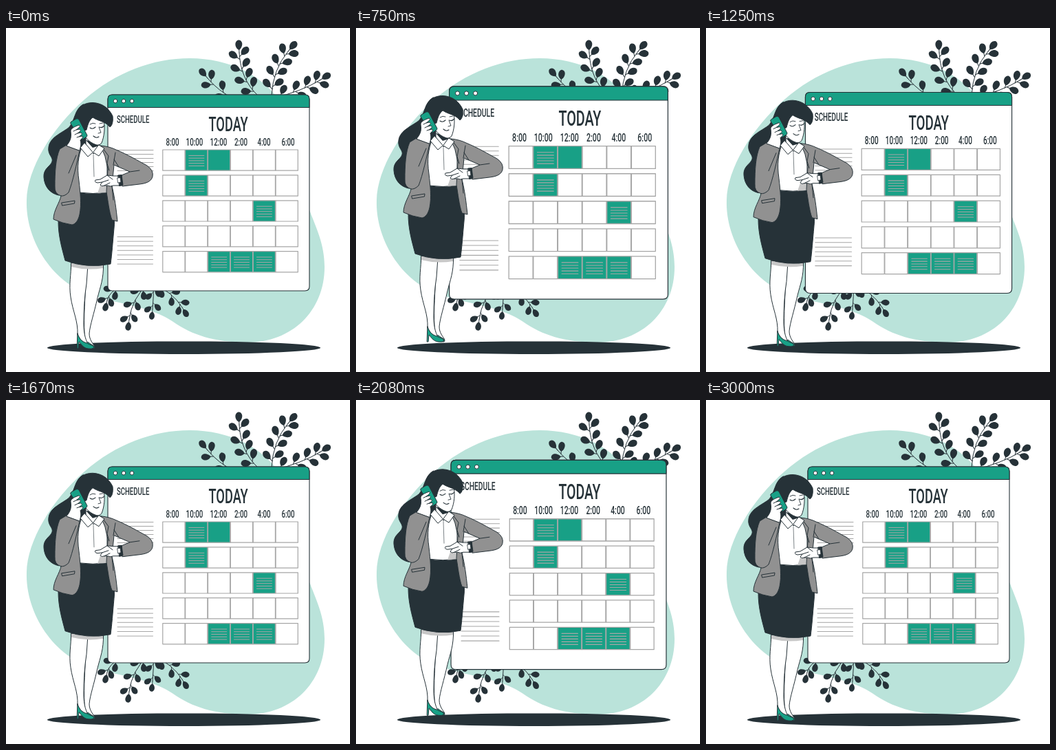
Recreate the animation shown at these times as an HTML page with a canvas. Size 500 by 500 pixels, loop 3.04 s.

```html
<!DOCTYPE html>
<html lang="en">
<head>
<meta charset="utf-8">
<title>Schedule</title>
<style>
html, body { margin: 0; width: 100%; height: 100%; overflow: hidden; background: #fff; }
canvas { display: block; width: 500px; height: 500px; }
</style>
</head>
<body>
<canvas id="stage" width="500" height="500"></canvas>
<script>
const ctx = document.getElementById('stage').getContext('2d');
const DARK = '#263238', GREEN = '#18a086', MINT = '#bae3da', GREY = '#919191', RULE = '#a6a6a6', SHADE = '#c7c7c7';
const LOOP = 3040, FPS = 24;
const NARROW = 0.63; // one condensed cut for all lettering

function shape(d, fill, stroke = DARK, width = 1) {
  const p = new Path2D(d);
  if (fill) { ctx.fillStyle = fill; ctx.fill(p); }
  if (stroke) { ctx.strokeStyle = stroke; ctx.lineWidth = width; ctx.stroke(p); }
}
const line = (d, color = DARK, width = 1) => shape(d, null, color, width);

function label(text, x, y, size, align = 'center') {
  ctx.save();
  ctx.translate(x, y);
  ctx.scale(NARROW, 1);
  ctx.font = `500 ${size}px Roboto, "Liberation Sans", sans-serif`;
  ctx.textAlign = align;
  ctx.fillStyle = DARK;
  ctx.fillText(text, 0, 0);
  ctx.restore();
}

function rules(x, y, w, n, gap) {
  for (let i = 0; i < n; i++) line(`M${x} ${y + i * gap}h${w}`, RULE);
}

// Piecewise linear track of [time, value] pairs
function track(t, keys) {
  for (let i = 1; i < keys.length; i++) {
    const [a, u] = keys[i - 1], [b, v] = keys[i];
    if (t <= b) return u + (v - u) * Math.max(0, (t - a) / (b - a));
  }
  return keys[keys.length - 1][1];
}

function leaf(x, y, angle, size) {
  ctx.save();
  ctx.translate(x, y);
  ctx.rotate(angle);
  ctx.scale(size, size);
  line('M0 0H6');
  shape('M4 0C6 -4 11 -6 15 -4.500C18 -3 19 -1 18.500 0.500C18 4 14 6 10 4.500C7 3.500 5 2 4 0Z', DARK, null);
  ctx.restore();
}

function sprig(x0, y0, cx, cy, x1, y1, pairs, size) {
  line(`M${x0} ${y0}Q${cx} ${cy} ${x1} ${y1}`);
  const at = u => {
    const v = 1 - u;
    return [
      v * v * x0 + 2 * u * v * cx + u * u * x1,
      v * v * y0 + 2 * u * v * cy + u * u * y1,
      Math.atan2(v * (cy - y0) + u * (y1 - cy), v * (cx - x0) + u * (x1 - cx))
    ];
  };
  for (let i = 0; i < pairs; i++) {
    for (const side of [-1, 1]) {
      const [x, y, a] = at((i + 0.6 + side * 0.1) / pairs);
      leaf(x, y, a + side * 0.85, size);
    }
  }
  leaf(...at(1), size);
}

function backdrop() {
  ctx.fillStyle = '#fff';
  ctx.fillRect(0, 0, 500, 500);
  shape('M30 250C31 205 66 146 114 104C160 64 214 44 267 44C325 44 372 69 397 105C424 148 424 217 440 262C451 291 463 314 463 347C463 412 415 457 351 457C303 457 270 446 243 427C212 406 170 402 130 390C70 375 28 310 30 250Z', MINT, null);
  sprig(366, 98, 341, 75, 339, 36, 4, 1);
  sprig(386, 98, 388, 60, 410, 34, 4, 1);
  sprig(330, 102, 309, 92, 293, 73, 2, 0.95);
  sprig(388, 102, 430, 92, 456, 76, 4, 0.98);
  sprig(168, 375, 150, 383, 147, 396, 2, 0.85);
  sprig(206, 372, 183, 393, 179, 424, 3, 0.85);
  sprig(214, 370, 215, 390, 213, 409, 2, 0.8);
  sprig(210, 370, 242, 383, 256, 406, 3, 0.85);
  ctx.beginPath();
  ctx.ellipse(258.5, 464.7, 198.5, 9.3, 0, 0, 7);
  ctx.fillStyle = DARK;
  ctx.fill();
}

function calendar(scale) {
  ctx.save();
  ctx.translate(294.5, 239.5);
  ctx.scale(scale, scale);
  ctx.translate(-294.5, -239.5);

  shape('M154.500 97H434.500Q441 97 441 103.500V375.500Q441 382 434.500 382H154.500Q148 382 148 375.500V103.500Q148 97 154.500 97Z', '#fff', DARK, 1.1);
  shape('M148 115.500V103.500Q148 97 154.500 97H434.500Q441 97 441 103.500V115.500Z', GREEN, DARK, 1.1);
  for (const x of [159, 171, 183]) {
    ctx.beginPath();
    ctx.arc(x, 106.2, 2.8, 0, 7);
    ctx.fillStyle = '#fff';
    ctx.fill();
    ctx.strokeStyle = DARK;
    ctx.lineWidth = 0.9;
    ctx.stroke();
  }

  label('SCHEDULE', 161, 137.5, 15.2, 'left');
  label('TODAY', 323, 149.7, 29);
  const hours = ['8:00', '10:00', '12:00', '2:00', '4:00', '6:00'];
  const centers = [242, 274, 309, 341.5, 375, 410];
  hours.forEach((h, i) => label(h, centers[i], 171, 15.5));

  rules(162, 177.5, 52, 6, 6);
  rules(162, 303.5, 51.5, 7, 6.6);

  const busy = [[1, 2], [1], [4], [], [2, 3, 4]];
  const w = 32.85;
  busy.forEach((cols, row) => {
    const y = 177 + row * 36.9;
    for (let col = 0; col < 6; col++) {
      const x = 227.5 + col * w, full = cols.includes(col);
      shape(`M${x + 0.3} ${y}h${w - 0.6}v30.200h${0.6 - w}z`, full ? GREEN : '#fff', RULE, 1.2);
      if (full && !(row === 0 && col === 2)) rules(x + 5.5, y + 8.4, 22, 5, 3.75);
    }
  });
  ctx.restore();
}

function legs() {
  shape('M118 343L141.500 343C142 365 137 376 133 392C128 415 122 432 121 444C121 453 126 458 129 463L116 461C112 440 114 410 115 388Z', '#fff');
  shape('M120 457C124 461 129 461 129 465Q128 467 122 465L114 458Z', GREEN);
  shape('M94.500 342C95 358 91 372 94 391C97 412 105 426 104 446C108 455 116 459 124 463L122 464C116 455 113 446 113 430C113 410 114 390 117 372L119 344Z', '#fff');
  shape('M94 342L141.500 344L141 349Q118 353 94.500 347Z', SHADE, null);
  line('M94.500 342V350M141.500 344V350');
  shape('M104 444C107 454 113 457 118 458C122 461 128 461 127.500 465Q125 467 119 466C112 465 109 459 106 456L105 466H103.500Z', GREEN);
}

function torso() {
  shape('M104 239Q125 241 147 239C155 257 159 276 157 291C155 313 154 328 152 343Q118 350 86 338C81 319 76 302 76 281Z', DARK);
  shape('M108 173L118 168L137 171L147 183L147 239Q126 242 106 239L102 194Z', '#fff');
  shape('M133 240L138 226L147 229V239Z', SHADE, null);
  // far arm and jacket side
  shape('M138 171C147 172 154 174 160 177C177 184 192 193 205 200Q215 207 213 216C211 224 202 226 194 227L169 230L168 214L180 209L157 199L154 230C158 246 160 262 162 281L154 279C150 268 148 250 146 238L148 205L144 187Z', GREY);
  line('M180 209L194 207M159 181L156 199M157 191L164 202');
  line('M138 171L149 186L147 197L150 207');
  line('M154 230L156 250');
  // near sleeve and jacket side
  shape('M78 176L88 170L107 178L111 171C105 186 103 201 106 222C108 240 110 256 107 271C105 280 101 285 96 286Q82 284 69 278C69 265 78 254 80 244Q70 241 71 230C71 210 72 190 78 176Z', GREY);
  line('M107 178C103 196 97 224 91 239Q85 245 80 244M91 211L102 185');
  line('M81 254L100 251L99.500 255L82 258Z');
  // neck and collar
  shape('M116 158L116 172L127 183L135 173L133 166Z', '#fff');
  shape('M116 163L126 174L136 171L134 166Z', DARK, null);
  shape('M114 167L108 174L119 187L126 181Z', '#fff');
  shape('M135 170L143 175L135 186L127 181Z', '#fff');
  line('M127 184L128 216', DARK, 0.6);
}

function watchHand() {
  shape('M168 215L156 215L147 214L137 220L130 221Q128 224 133 225L140 224L137 228Q139 231 143 229L148 229Q151 231 156 229L168 229Z', '#fff');
  line('M140 224L149 221M143 229L151 225M147 214L155 220');
  shape('M163 214L168 213.500L170 228L165 229.500Z', DARK);
  shape('M162 218L166 217.500L167 224L163 225Z', '#fff', DARK, 0.8);
}

function head() {
  shape('M111 130C118 124 133 124 142 135C144 145 143 157 139 167Q135 172 129 169C122 166 116 161 113 154Z', '#fff');
  // front locks
  shape('M101 128C104 114 114 108.500 126 108.500C140 109 150 117 155 128C156 137 154 142 151 144C147 139 142 137 137 135C131 133 128 131 126 130C121 134 119 140 117 148L112 150L98 146Z', DARK);
  line('M122 145Q126 148 130 144M136 144Q139 146 143 142', DARK, 1.1);
  line('M122 140Q126 137 130 139M136 139L141 138', DARK, 0.9);
  line('M135 144L138 152L134 153', DARK, 0.9);
  line('M127 157Q131 161 135 158', DARK, 1.1);
}

function phoneHand() {
  shape('M94 139Q93 137 95 136L102 132Q104 131 106 133L118 156Q118 158 116 159L111 162Q109 162 108 160Z', GREEN);
  shape('M88 171C95 163 95 157 94 150C94 147 97 145 101 143L106 141Q109 142 106 145L102 148L107 147Q110 148 107 151L104 153L109 152Q112 154 109 156L106 158L111 157Q113 159 110 161L108 163C110 169 108 174 107 178Z', '#fff');
  line('M102 148L98 150M104 153L100 155M106 158L103 159');
}

function woman(y) {
  ctx.save();
  ctx.translate(0, y);
  legs();
  shape('M112 111C99 119 101 133 92 144C83 152 64 158 62 173C60 184 69 188 67 194C65 201 54 204 55 217C56 231 64 240 76 243L88 242L112 184L122 164L130 125Z', DARK);
  torso();
  head();
  phoneHand();
  watchHand();
  ctx.restore();
}

function draw(ms) {
  const t = Math.floor((ms % LOOP + 4.9) * FPS / 1000) * 1000 / FPS;
  const phase = (t % 1500) / 1500;
  const beat = track(t, [[496, 1], [796, 1.1], [1396, 1], [1690, 1], [1988, 1.1], [2285, 1]]);
  backdrop();
  calendar(beat);
  woman(-10 * (1 - Math.abs(1 - 2 * phase)));
}

ctx.lineJoin = ctx.lineCap = 'round';
let start = null;
function tick(now) {
  if (start === null) start = now;
  draw(now - start);
  requestAnimationFrame(tick);
}
draw(0);
requestAnimationFrame(tick);
</script>
</body>
</html>
```
